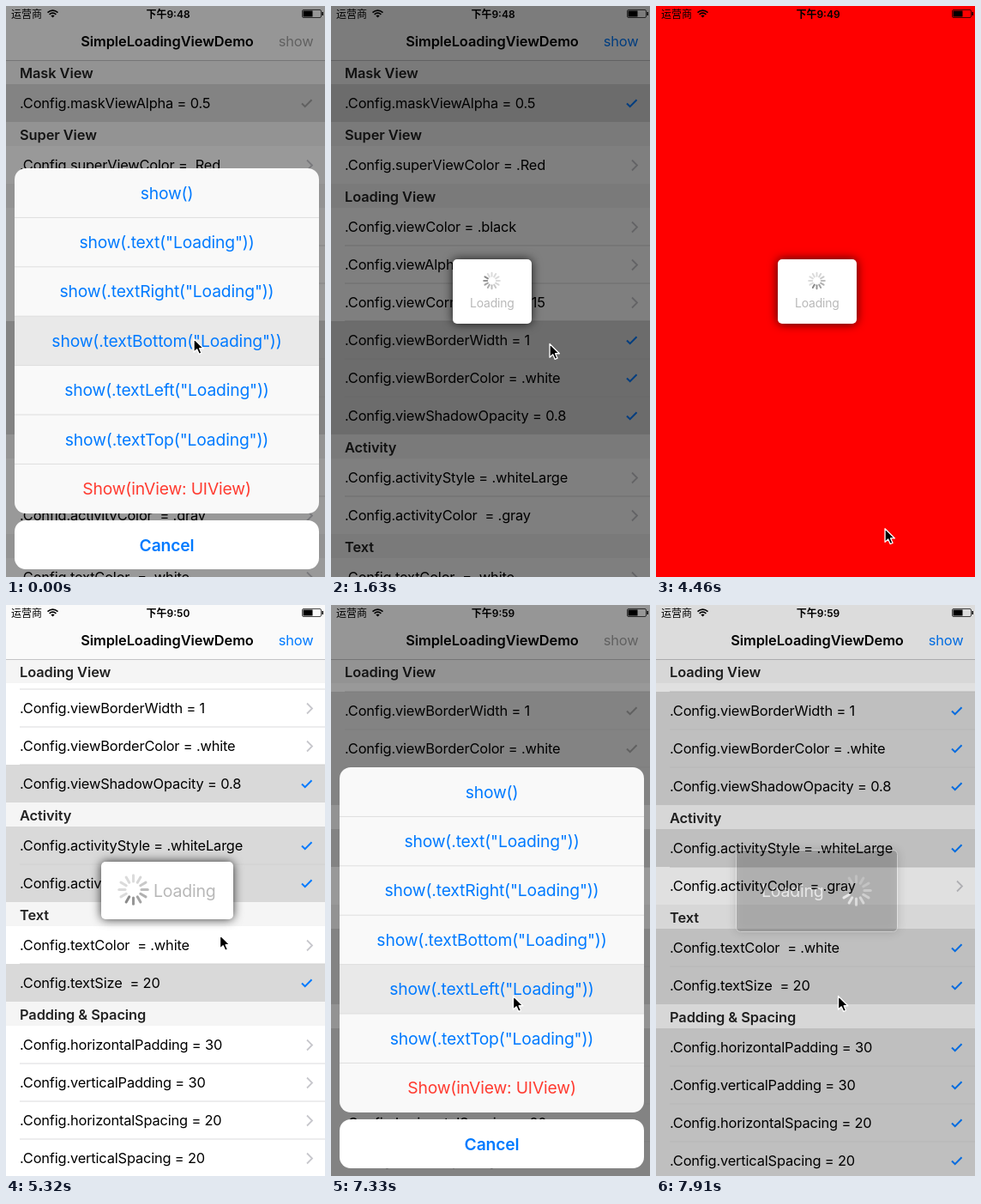
Animation of 372x665 px, one loop 8000 ms. Source, as an HTML page:

```html
<!DOCTYPE html>
<html lang="zh">
<head>
<meta charset="utf-8">
<title>SimpleLoadingViewDemo</title>
<style>
html, body { margin: 0; width: 100%; height: 100%; overflow: hidden; background: #fff; }
svg { display: block; }
text { font-family: Inter, "Noto Sans CJK SC", "Noto Sans CJK", sans-serif; font-size: 16.4px; letter-spacing: -.01em; white-space: pre; }
.bold { font-weight: 600; letter-spacing: -.005em; }
.status { font-size: 12px; letter-spacing: 0; }
.action { font-size: 19.3px; letter-spacing: -.008em; }
.shadow { filter: drop-shadow(0 0 6px rgba(0, 0, 0, .8)); }
</style>
</head>
<body>
<svg id="stage" width="372" height="665" viewBox="0 0 372 665"></svg>
<script>
const W = 372, H = 665, LOOP = 8000, STEP = 148;
const BLUE = '#007aff';
const stage = document.getElementById('stage');

const sections = [
  ['Mask View', 'maskViewAlpha = 0.5'],
  ['Super View', 'superViewColor = .Red'],
  ['Loading View', 'viewColor = .black', 'viewAlpha = 0.75', 'viewCornerRadius = 15',
    'viewBorderWidth = 1', 'viewBorderColor = .white', 'viewShadowOpacity = 0.8'],
  ['Activity', 'activityStyle = .whiteLarge', 'activityColor  = .gray'],
  ['Text', 'textColor  = .white', 'textSize  = 20'],
  ['Padding & Spacing', 'horizontalPadding = 30', 'verticalPadding = 30',
    'horizontalSpacing = 20', 'verticalSpacing = 20']
];
const actions = ['show()', ...['text', 'textRight', 'textBottom', 'textLeft', 'textTop']
  .map(name => `show(.${name}("Loading"))`), 'Show(inView: UIView)'];

const smallBox = { x: 142, y: 295, w: 92, h: 75, tx: 162, ty: 351, size: 13.9, sx: 187.5, sy: 320, r: 10 };
const wideBox = { x: 111, y: 299, w: 154, h: 67, tx: 172, ty: 339.5, size: 19.5, sx: 148.5, sy: 331.5, r: 18 };
const darkBox = { x: 93.5, y: 285.5, w: 188, h: 95, tx: 123, ty: 339.5, size: 19.5, sx: 233.5, sy: 332.5, r: 18, dark: true };

// lead: steps from the tap to the start of the scene; path: [step, x, y] of the pointer
const scenes = [
  { start: 0, lead: 0, clock: '9:48', scroll: 0, picked: /maskView|Border|Shadow/, action: 3, mask: '#000', alpha: .5,
    box: smallBox, phase: 3, path: [[0, 218.5, 387], [3, 245, 388.5], [6, 254, 393], [11, 254.5, 393], [15, 292, 633]] },
  { start: 2380, lead: 1, clock: '9:49', scroll: 0, picked: /superView|Shadow/, action: 3, mask: '#f00', alpha: 1,
    box: smallBox, phase: 7, path: [[0, 219, 389], [4, 223, 397], [9, 224, 399], [15, 275, 650]] },
  { start: 4730, lead: 1, clock: '9:50', scroll: 269, picked: /Shadow|activity|textSize/, action: 2, mask: '#000', alpha: 0,
    box: wideBox, phase: 0, path: [[0, 240, 345], [3, 249, 384]] },
  { start: 7030, lead: -2, clock: '9:59', scroll: 266, picked: /Border|Shadow|Style|text|Padding|Spacing/, action: 4,
    mask: '#000', alpha: .5, box: darkBox, phase: 10, path: [[0, 212, 455]] }
];

const esc = s => s.replace(/&/g, '&amp;');
const text = (s, x, y, fill = '#000', cls = '', anchor = 'start', style = '') =>
  `<text x="${x}" y="${y}" fill="${fill}" class="${cls}" text-anchor="${anchor}" style="${style}">${esc(s)}</text>`;
const rect = (x, y, w, h, fill, extra = '') =>
  `<rect x="${x}" y="${y}" width="${w}" height="${h}" fill="${fill}" ${extra}/>`;
const line = (d, color, width) => `<path d="${d}" fill="none" stroke="${color}" stroke-width="${width}"/>`;
const cover = (fill, alpha) => rect(0, 0, W, H, fill, `opacity="${alpha}"`);

function list(scene, tint) {
  let y = 63 - scene.scroll, out = '', sticky = '';
  const header = (name, top) => rect(0, top, W, 28, '#f5f5f5') + text(name, 16, top + 20.5, '#222', 'bold');
  for (const [name, ...rows] of sections) {
    if (y <= 63) sticky = header(name, 63);
    out += header(name, y);
    y += 28;
    rows.forEach((row, i) => {
      const mid = y + 22, on = scene.picked.test(row);
      if (on) out += rect(0, y, W, 44, '#d9d9d9');
      if (i) {
        const soft = on || scene.picked.test(rows[i - 1]);
        out += rect(16, y - .5, W, 1, soft ? '#d2d2d2' : '#dcdcde');
      }
      out += text('.Config.' + row, 16, mid + 6);
      out += on ? line(`M345 ${mid + .5}l3.7 3.7 7.8 -8`, tint, 2)
        : line(`M351 ${mid - 5.5}l6 6 -6 6`, '#c7c7cc', 1.8);
      y += 44;
    });
  }
  return out + sticky;
}

const navBar = tint => rect(0, 0, W, 63, '#fafafa') + rect(0, 63, W, 1, '#c4c4c6') +
  text('SimpleLoadingViewDemo', 188, 47, '#000', 'bold', 'middle') +
  text('show', 358.5, 47, tint, '', 'end');

const statusBar = clock => text('运营商', 6, 14, '#000', 'status') +
  line('M48.5 7.6Q54.5 2.6 60.5 7.6M50.6 9.8Q54.5 6.6 58.4 9.8', '#000', 1.6) +
  '<path d="M52.4 11.4Q54.5 9.6 56.6 11.4L54.5 13.6Z"/>' +
  text('下午' + clock, 189, 14, '#000', 'status bold', 'middle') +
  rect(345.5, 4.5, 22, 9, 'none', 'rx="1.5" stroke="#000" stroke-opacity=".7"') +
  rect(346.5, 5.5, 11, 7, '#000') + rect(368.5, 7, 1.5, 4, '#000');

function sheet(active, shift) {
  const rowH = 57.4, top = 189;
  let out = `<g transform="translate(0 ${shift})">` + rect(10, top, 355, 402, '#f9f9f9', 'rx="13"');
  actions.forEach((label, i) => {
    const y = top + i * rowH;
    if (i === active) out += rect(10, y, 355, rowH, '#e9e9e9');
    if (i) out += rect(10, y - .5, 355, 1, '#dedede');
    out += text(label, 187.5, y + 35.5, i === 6 ? '#ff3b30' : BLUE, 'action', 'middle');
  });
  return out + rect(10, 599, 355, 57, '#fff', 'rx="13"') +
    text('Cancel', 187.5, 634.5, BLUE, 'action bold', 'middle') + '</g>';
}

function spinner({ sx, sy, r, dark }, lead) {
  let out = '';
  for (let i = 0; i < 12; i++) {
    const age = (lead - i + 1200) % 12;
    const alpha = Math.max(.3, 1 - age * .11);
    out += `<path d="M0 ${-r * .53}V${-r * .93}" transform="translate(${sx} ${sy}) rotate(${i * 30})" stroke="${dark ? '#fff' : '#8a8a8a'}"
      stroke-width="${r * .13 + .7}" stroke-linecap="round" opacity="${alpha}"/>`;
  }
  return out;
}

function loading(box, lead, opacity) {
  const skin = box.dark ? 'stroke="#fff"' : '';
  return `<g opacity="${opacity}"><g class="shadow">` +
    rect(box.x, box.y, box.w, box.h, box.dark ? 'rgba(0,0,0,.75)' : '#fff', `rx="5" ${skin}`) + '</g>' +
    text('Loading', box.tx, box.ty, box.dark ? '#fff' : '#b8b8b8', '', 'start', `font-size:${box.size}px`) +
    spinner(box, lead) + '</g>';
}

function pointer(path, step) {
  const next = path.findIndex(p => p[0] > step);
  let [, x, y] = path[path.length - 1];
  if (next > 0) {
    const a = path[next - 1], b = path[next], u = (step - a[0]) / (b[0] - a[0]);
    x = a[1] + (b[1] - a[1]) * u;
    y = a[2] + (b[2] - a[2]) * u;
  }
  return `<path transform="translate(${x} ${y}) scale(1.08)" d="M.5 .5V15L3.9 11.9 6.2 17 8.8 15.9 6.6 10.9H11Z"
    stroke="#fff" stroke-width="1.2" stroke-linejoin="round"/>`;
}

function draw(time) {
  const scene = scenes.filter(s => s.start <= time).pop();
  const step = Math.floor((time - scene.start) / STEP + .1);
  const since = step + scene.lead;
  const gone = since <= 0 ? 0 : [0, .2, .8][since] ?? 1;
  const shown = since < 4 ? 0 : since === 4 ? .24 : 1;
  const tint = since < 2 ? '#a0a0a0' : BLUE;
  let out = rect(0, 0, W, H, '#fff') + list(scene, tint) + navBar(tint);
  const red = scene.mask === '#f00';
  if (!red) out += statusBar(scene.clock);
  if (shown) out += cover(scene.mask, scene.alpha * shown);
  if (red) out += statusBar(scene.clock);
  if (gone < 1) {
    out += cover('#000', .4 * (1 - gone)) + sheet(since < 0 ? -1 : scene.action, 476 * gone);
  }
  if (shown) out += loading(scene.box, Math.floor(step * .147 * 12) + scene.phase, shown);
  return out + pointer(scene.path, step);
}

let last = '';
function tick() {
  const picture = draw(performance.now() % LOOP);
  if (picture !== last) stage.innerHTML = last = picture;
  requestAnimationFrame(tick);
}
tick();
</script>
</body>
</html>
```
